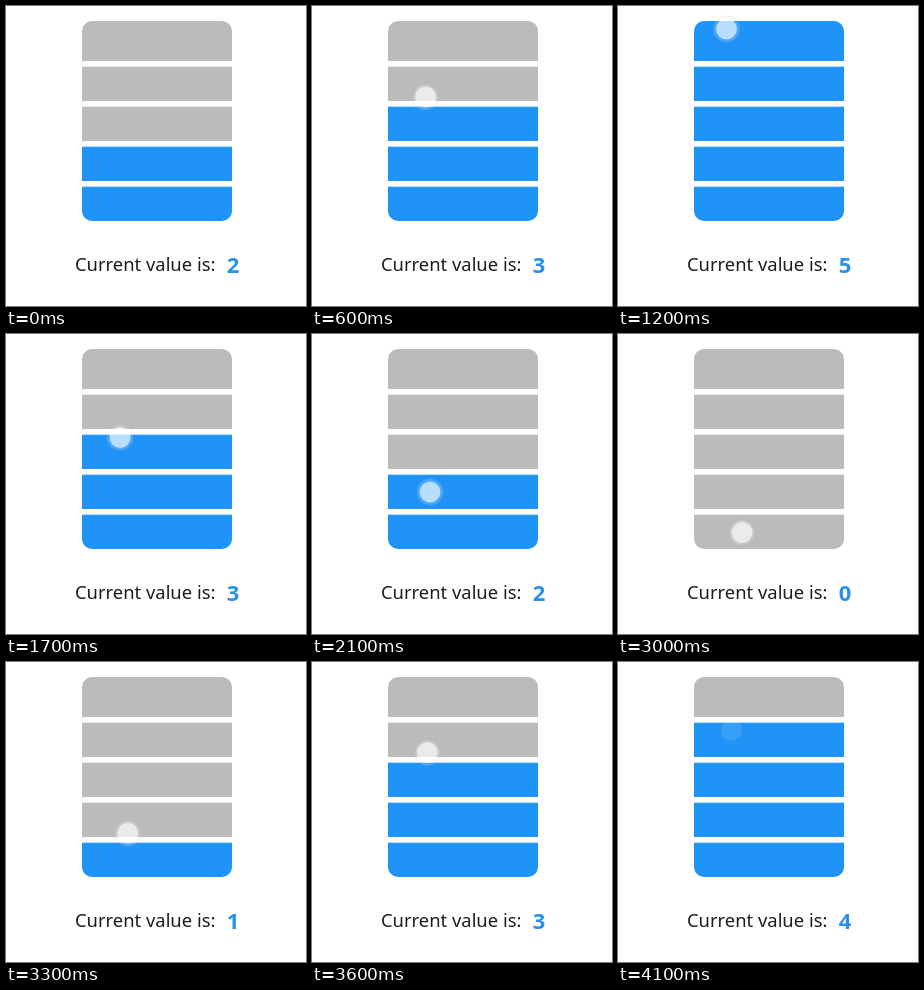
An HTML page for the animation above (4.2 s loop, 300 by 300 pixels).

```html
<!DOCTYPE html>
<html lang="en">
<head>
<meta charset="utf-8">
<title>Stepped slider</title>
<style>
  html, body { margin: 0; width: 100%; height: 100%; overflow: hidden; background: #fff; }
  svg { display: block; width: 100vw; height: 100vh; font-family: "Noto Sans", "Open Sans", sans-serif; }
</style>
</head>
<body>
<svg viewBox="0 0 300 300">
  <clipPath id="card"><rect x="76" y="15" width="150" height="200" rx="10"/></clipPath>
  <g id="segments" clip-path="url(#card)"></g>
  <text x="69" y="265" font-size="18.4" fill="#1c1c1c">Current value is:</text>
  <text id="value" x="227" y="267" font-size="22" font-weight="700" fill="#2a90ec" text-anchor="middle"></text>
  <g id="touch">
    <circle id="halo" r="13" fill="#fff" fill-opacity=".18" stroke="#9a9ac8" stroke-opacity=".22"/>
    <circle r="10.3" fill="#fff" fill-opacity=".62" stroke="#fff" stroke-opacity=".2"/>
  </g>
</svg>
<script>
const LOOP = 4200, STEP = 100, SEGMENTS = 5, PITCH = 40, BOTTOM = 215;
const BLUE = '#2094f6', GREY = '#bcbbbb';

// The finger rests at start, then makes each move and waits for the next
const start = { x: 118, y: 150 };
const moves = [
  { from: 200, to: 1040, x: 108.5, y: 23 },
  { from: 1200, to: 1850, x: 115, y: 116 },
  { from: 1900, to: 2100, x: 118, y: 158 },
  { from: 2500, to: 3000, x: 124, y: 198.5 },
  { from: 3100, to: 3780, x: 113.5, y: 68 }
];

const byId = id => document.getElementById(id);
const segments = byId('segments'), value = byId('value'), touch = byId('touch'), halo = byId('halo');
const clamp = (v, max = 1) => Math.max(0, Math.min(max, v));
const ease = p => p * p * (3 - 2 * p);

// Segments are stored from the bottom up; the top one has no gap above it
for (let i = 0; i < SEGMENTS; i++) {
  const height = i < SEGMENTS - 1 ? 34.3 : PITCH;
  const rect = document.createElementNS('http://www.w3.org/2000/svg', 'rect');
  const box = { x: 76, y: BOTTOM - PITCH * i - height, width: 150, height };
  for (const name in box) rect.setAttribute(name, box[name]);
  segments.append(rect);
}

function fingerAt(t) {
  let { x, y } = start;
  for (const move of moves) {
    const p = ease(clamp((t - move.from) / (move.to - move.from)));
    x += (move.x - x) * p;
    y += (move.y - y) * p;
  }
  return { x, y };
}

function draw(t) {
  const { x, y } = fingerAt(t);
  const level = clamp(Math.ceil((198.4 - y) / PITCH), SEGMENTS);
  [...segments.children].forEach((rect, i) => rect.setAttribute('fill', i < level ? BLUE : GREY));
  value.textContent = level;
  const fadeOut = clamp((4140 - t) / 240);
  touch.setAttribute('transform', `translate(${x} ${y})`);
  touch.setAttribute('opacity', clamp((t - 100) / 200) * fadeOut);
  halo.setAttribute('opacity', fadeOut);
}

function tick() {
  const t = performance.now() % LOOP;
  draw(Math.floor(t / STEP) * STEP);
  requestAnimationFrame(tick);
}
tick();
</script>
</body>
</html>
```
